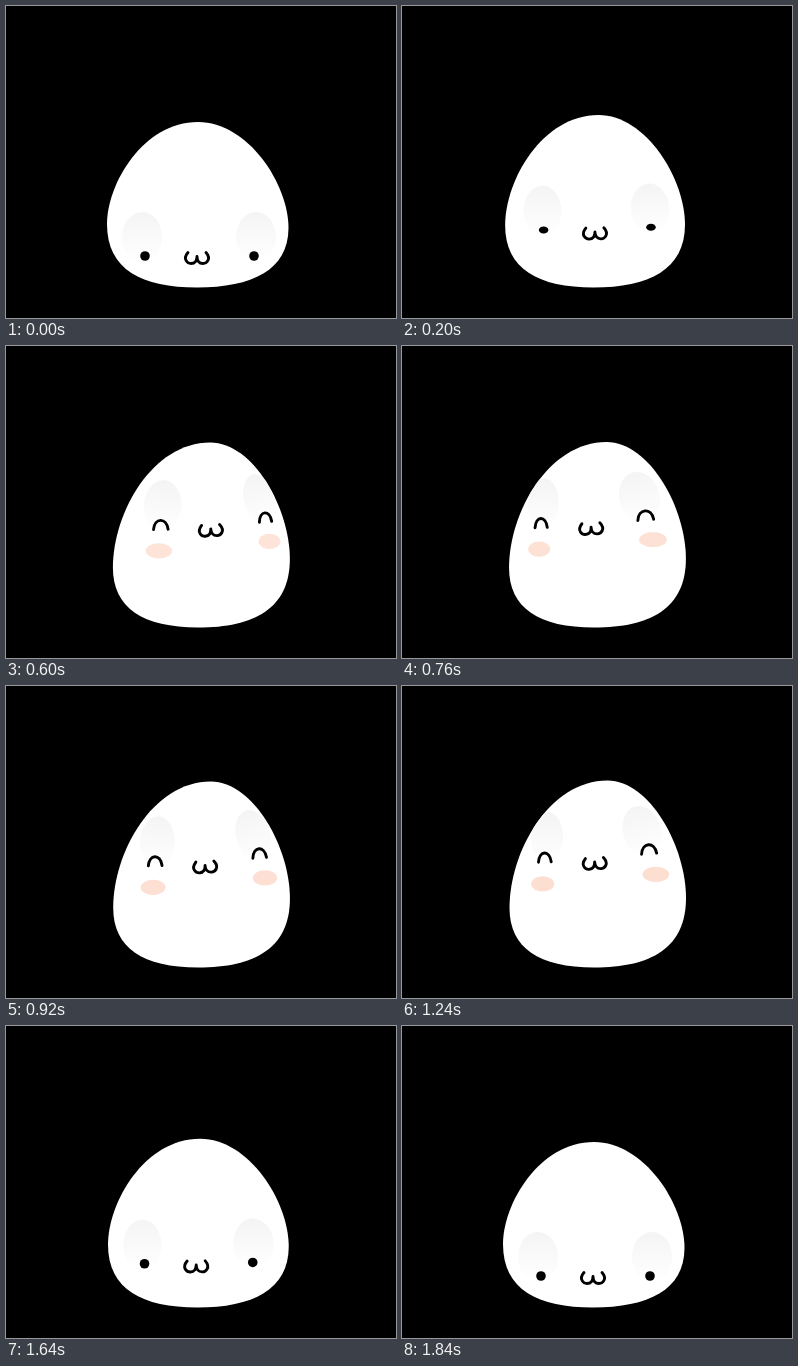
These frames come from a looping animation (390x312 px, 2200 ms). An HTML page with a canvas:

```html
<!DOCTYPE html>
<html lang="en">
<head>
<meta charset="utf-8">
<title>Happy mochi</title>
<style>
html, body { margin: 0; width: 100%; height: 100%; overflow: hidden; background: #000; }
canvas { display: block; width: 390px; height: 312px; }
</style>
</head>
<body>
<canvas id="stage" width="390" height="312"></canvas>
<script>
const ctx = document.getElementById('stage').getContext('2d');
const LOOP = 2200, STEP = 40, LAST = 1840;

const clamp = v => Math.max(0, Math.min(1, v));
const mix = (a, b, k) => a + (b - a) * k;
const ramp = (a, b, t) => clamp((t - a) / (b - a));
const smooth = (a, b, t) => { const k = ramp(a, b, t); return k * k * (3 - 2 * k); };

// Outline: start point, then four cubic curves
const REST = [192, 116, 242, 116, 282.5, 178, 282.5, 222, 282.5, 264, 246, 281.5, 191, 281.5,
  136, 281.5, 101, 264, 101, 218, 101, 178, 137, 116, 192, 116];
const TALL = [205.5, 94.5, 248, 94.5, 284, 161, 284, 212, 284, 262, 249, 281.5, 192, 281.5,
  137, 281.5, 107.5, 262, 107.5, 222, 107.5, 166, 147, 94.5, 205.5, 94.5];

// 0 = sitting, 1 = fully stretched up
function lift(t) {
  const up = 0.885 * smooth(20, 455, t) + 0.115 * ramp(455, 1240, t);
  const settle = 0.012 * Math.sin(Math.PI * ramp(1690, LAST, t));
  return up * (1 - smooth(1459, 1700, t)) - settle;
}

// Sideways head shake in pixels
function turn(t) {
  const size = 14.5 * smooth(120, 600, t) * (1 - smooth(1520, 1680, t));
  return size * Math.cos(2 * Math.PI * (t - 558.6) / 298);
}

function body(p) {
  const c = REST.map((v, i) => mix(v, TALL[i], p));
  ctx.beginPath();
  ctx.moveTo(c[0], c[1]);
  for (let i = 2; i < c.length; i += 6) ctx.bezierCurveTo(...c.slice(i, i + 6));
  ctx.closePath();
}

function oval(x, y, rx, ry, fill, tilt = 0) {
  ctx.fillStyle = fill;
  ctx.beginPath();
  ctx.ellipse(x, y, rx, ry, tilt, 0, 2 * Math.PI);
  ctx.fill();
}

function shade(x, y, rx, ry, tilt) {
  const g = ctx.createLinearGradient(0, -ry, 0, ry);
  g.addColorStop(0, '#f4f4f4');
  g.addColorStop(1, '#fff');
  ctx.save();
  ctx.translate(x, y);
  ctx.rotate(tilt);
  oval(0, 0, rx, ry, g);
  ctx.restore();
}

function eye(x, y, w, p, tilt) {
  if (p < 0.45) {
    oval(x, y, 4.8, mix(4.8, 1.6, ramp(0.25, 0.45, p)), '#000');
    return;
  }
  const h = ramp(0.35, 0.65, p), r = w / 2 - 1.4;
  ctx.save();
  ctx.translate(x, y);
  ctx.rotate(tilt);
  ctx.beginPath();
  ctx.moveTo(-r, 5 * h);
  ctx.bezierCurveTo(-r * 0.8, -7 * h, r * 0.8, -7 * h, r, 5 * h);
  ctx.stroke();
  ctx.restore();
}

function mouth(x, y, tilt) {
  ctx.save();
  ctx.translate(x, y);
  ctx.rotate(tilt);
  ctx.beginPath();
  ctx.moveTo(-9, -5);
  ctx.bezierCurveTo(-15, 2, -9, 6, -6, 6);
  ctx.bezierCurveTo(-2, 6, 0, 3, 0, -1);
  ctx.bezierCurveTo(0, 3, 2, 6, 6, 6);
  ctx.bezierCurveTo(9, 6, 15, 2, 9, -5);
  ctx.stroke();
  ctx.restore();
}

function draw(t) {
  const p = lift(t), u = turn(t);
  const x = mix(191, 196, p) + u, y = mix(251.5, 177, p);

  ctx.fillStyle = '#000';
  ctx.fillRect(0, 0, 390, 312);
  ctx.save();
  body(p);
  ctx.fillStyle = '#fff';
  ctx.fill();
  ctx.clip();

  const ry = mix(25, 26, p);
  shade(x + mix(-55, -47.5, p), y + mix(-20.5, -24.5, p), mix(20, 16.5, p) + u * 0.2, ry, 0.07 * p);
  shade(x + mix(59, 47.5, p), y + mix(-20.5, -31.5, p), mix(20, 18, p) - u * 0.3, ry, -0.29 * p);

  ctx.globalAlpha = ramp(0.5, 0.97, p);
  oval(x - 52, y + 20.8, 12 + u * 0.13, 7.6, '#fddfd2');
  oval(x + 60.5 - u * 0.2, y + 11.4, 12.7 - u * 0.17, 7.6, '#fddfd2');
  ctx.globalAlpha = 1;

  ctx.strokeStyle = '#000';
  ctx.lineWidth = 2.9;
  ctx.lineCap = ctx.lineJoin = 'round';
  eye(x + mix(-52, -50, p), y + mix(-1.5, -6, p), 16 + u * 0.15, p, -0.03);
  eye(x + mix(57, 54, p), y + mix(-1.5, -14.3, p), 17.2 - u * 0.22, p, -0.08);
  mouth(x, y, -0.06 * p);
  ctx.restore();
}

function tick(now) {
  const t = now % LOOP;
  draw(Math.min(LAST, Math.floor(t / STEP) * STEP));
  requestAnimationFrame(tick);
}

draw(0);
requestAnimationFrame(tick);
</script>
</body>
</html>
```
